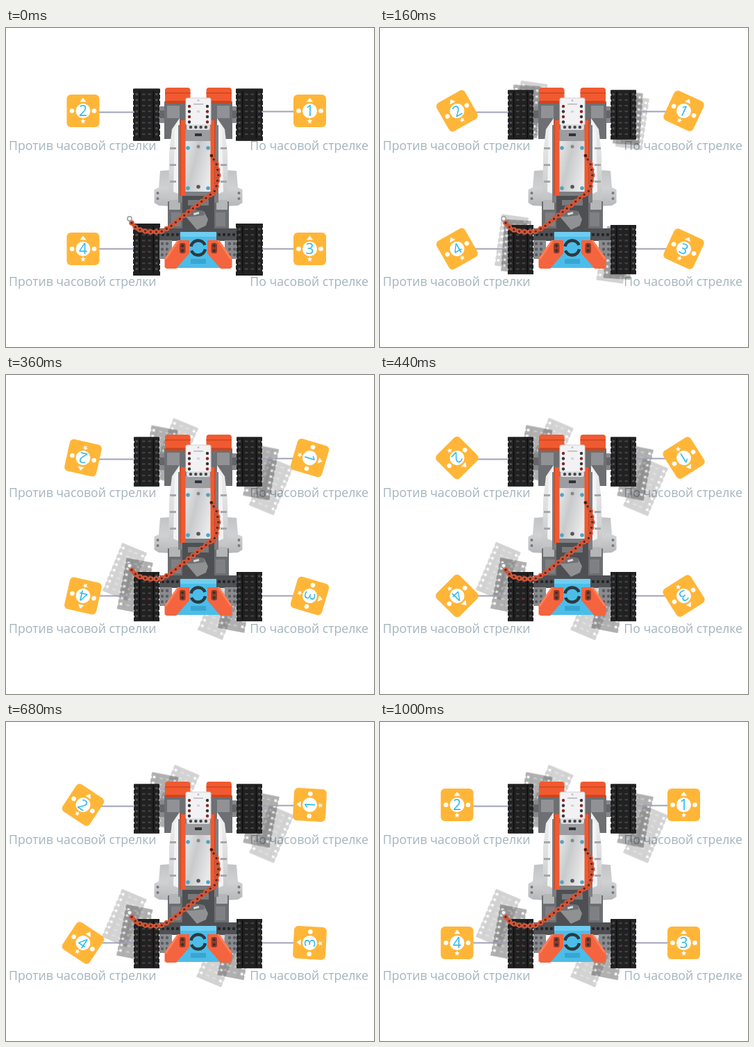
Recreate the animation shown at these times as an HTML page. Size 530 px wide and 460 px high, loop 1040 ms.

```html
<!DOCTYPE html>
<html lang="ru">
<head>
<meta charset="utf-8">
<style>
  html, body { margin: 0; width: 100%; height: 100%; overflow: hidden; background: #fff; }
  svg { display: block; width: 530px; height: 460px; }
  text { font-family: "Open Sans", "Noto Sans", sans-serif; }
</style>
</head>
<body>
<svg id="stage" viewBox="0 0 530 460"></svg>
<script>
const LOOP = 1040, STEP = 40;
const PIVOT = [277, 222];
const WHEELS = [[202.5, 125], [350.5, 125], [202.5, 319.5], [350.5, 319.5]];
const BADGES = [
  { n: 1, x: 437.5, y: 119.5, dir: 1 },
  { n: 2, x: 111, y: 119.5, dir: -1 },
  { n: 3, x: 437.5, y: 318.5, dir: 1 },
  { n: 4, x: 111, y: 318.5, dir: -1 },
];
const GHOSTS = [
  { angle: 23, opacity: 0.2 },
  { angle: 11, opacity: 0.36 },
];

const attrs = o => Object.entries(o).map(([k, v]) => `${k}="${v}"`).join(' ');
const rect = (x, y, width, height, fill, more = {}) =>
  `<rect ${attrs({ x, y, width, height, fill, ...more })}/>`;
const dot = (cx, cy, r, fill, more = {}) => `<circle ${attrs({ cx, cy, r, fill, ...more })}/>`;
const poly = (points, fill, more = {}) => `<polygon ${attrs({ points, fill, ...more })}/>`;
const range = n => [...Array(n).keys()];
const mirrored = s => s + `<g transform="matrix(-1 0 0 1 554 0)">${s}</g>`;

function gradient(id, direction, ...colors) {
  const stops = colors.map((c, i) =>
    `<stop offset="${i / (colors.length - 1)}" stop-color="${c}"/>`).join('');
  return `<linearGradient id="${id}" ${attrs(direction)}>${stops}</linearGradient>`;
}

function wheel(gap, bar) {
  const rows = range(8).map(i => {
    const y = -31 + i * 8.2;
    return rect(-16, y, 3.4, 3.2, gap) + rect(12.6, y, 3.4, 3.2, gap) +
      rect(-6.5, y + 0.5, 4.5, 2.2, bar) + rect(2, y + 0.5, 4.5, 2.2, bar);
  }).join('');
  const teeth = range(9).map(i => rect(-18.5, -35.5 + i * 8.2, 37, 5.6, '#212122')).join('');
  return rect(-17.5, -35.5, 35, 71, '#212122', { rx: 1 }) + teeth + rows +
    rect(-10.5, -34, 1.2, 68, '#0b0b0b') + rect(9.3, -34, 1.2, 68, '#0b0b0b');
}

function badge({ n, x, y }) {
  const star = range(10).map(i => {
    const a = i * Math.PI / 5, r = i % 2 ? 1.7 : 4;
    return `${(r * Math.sin(a)).toFixed(2)},${(15 - r * Math.cos(a)).toFixed(2)}`;
  }).join(' ');
  return `<g transform="translate(${x} ${y})"><g class="badge">` +
    rect(-23.5, -23.5, 47, 47, '#ffb638', { rx: 6 }) +
    dot(0, 0, 10.5, '#fff') + poly('-4.5,-13 4.5,-13 0,-19', '#fff') +
    dot(-16, 0, 3.3, '#fff') + dot(16, 0, 3.3, '#fff') + poly(star, '#fff') +
    `<text y="7.5" font-size="21" fill="#2bb8ee" text-anchor="middle">${n}</text></g></g>`;
}

function label(text, x, y, anchor) {
  return `<text x="${x}" y="${y}" font-size="17.7" fill="#a3b4bd" text-anchor="${anchor}">${text}</text>`;
}

function chassis() {
  const half =
    rect(220, 113, 20, 24, '#85878a') + rect(221, 119, 18, 11, '#636568') +
    rect(228, 106, 50, 54, '#6d6f72') + rect(232, 112, 18, 18, '#909295') +
    poly('236,205 222,206 220,230 213.5,233 213.5,252 220,256 238,257', 'url(#wing)') +
    dot(218.5, 238, 2, '#77797c') + dot(218.5, 246, 2, '#77797c') +
    poly('239,146 250,130 252,262 234,262 235,180', 'url(#side)') +
    poly('243,146 250,134 250,240 241,236', '#f4f4f5') +
    range(3).map(i => rect(236, 172 + i * 24, 9, 3, '#a5a7aa')).join('') +
    rect(233, 250, 44, 42, '#6c6e71') + rect(235, 248, 16, 14, '#b4b6b8') +
    rect(238, 266, 14, 20, '#7e8083') +
    rect(229, 86, 36.5, 23, '#f15a30', { rx: 4 }) + rect(229, 93, 36.5, 1.5, '#cf4620') +
    rect(229, 105, 36.5, 4, '#cc4520', { rx: 2 });
  const core =
    rect(248, 140, 58, 112, '#7d7f82') + rect(254, 242, 46, 50, '#4d4f52') +
    rect(262, 248, 30, 8, '#77797c') +
    rect(258, 146, 38, 90, 'url(#plate)') +
    rect(258, 146, 38, 17, '#9b9da0') + rect(272, 152, 10, 4, '#303236') +
    dot(277, 171, 2.5, '#85888c') + dot(277, 229, 2.8, '#54575b') +
    [173, 231].map(y => dot(262, y, 2.8, '#4aa5c8') + dot(291, y, 2.8, '#4aa5c8')).join('') +
    rect(250.5, 133, 8, 109, '#ee5a32') + rect(294.5, 133, 7, 109, '#ee5a32') +
    rect(250.5, 133, 1.5, 109, '#cc4822') + rect(300, 133, 1.5, 109, '#cc4822');
  const controller =
    rect(259, 101, 36, 39, '#f2f2f4', { rx: 2, stroke: '#cfd0d3' }) +
    rect(260, 139, 34, 8, '#dcdddf', { rx: 3 }) +
    range(4).map(i => dot(264, 113 + i * 7.5, 2.2, i % 2 ? '#343436' : '#8b2522') +
      dot(290, 113 + i * 7.5, 2.2, i % 2 ? '#8b2522' : '#343436') +
      dot(266 + i * 7.3, 143, 2.2, '#45474a')).join('') +
    rect(270, 109, 14, 1.5, '#b4b6b9') + dot(277, 104.5, 1.3, '#b4b6b9') +
    rect(275, 119, 4, 3, '#d2d3d6');
  return mirrored(half) + core + controller;
}

function front() {
  const half =
    rect(221, 289, 56, 18, '#4e5053') + rect(221, 306, 18, 27, '#8a8c8f') +
    range(4).map(i => dot(226 + i * 7, 298, 2.2, '#252629')).join('') +
    range(3).map(i => dot(225, 311 + i * 8, 2.2, '#5b5d60') + dot(232, 311 + i * 8, 2.2, '#5b5d60')).join('');
  const foot =
    poly('228.5,345 228.5,332 247,306 264,306 264,325 245,347 231,347', '#f4643f') +
    poly('228.5,332 247,306 250,306 231,334', '#ff8058') +
    rect(250, 310, 8.5, 15, '#933b27', { rx: 3 }) +
    dot(254.2, 314, 2, '#303236') + dot(254.2, 321, 2, '#303236');
  const servo =
    rect(251, 294, 52, 46, '#4cbde9') + rect(251, 294, 52, 7, '#6fcdf1') +
    rect(240, 333, 74, 13, '#4cbde9') + rect(266, 333, 22, 7, '#38a5d2') +
    '<path d="M266.5 315A10.5 10.5 0 0 1 286.5 313M287 319A10.5 10.5 0 0 1 267 321" fill="none" stroke="#2d3940" stroke-width="4.5"/>';
  return mirrored(half) + servo + mirrored(foot) +
    poly('259,272 266,262 285,264 291,276 288,285 275,291', '#8f9193') +
    poly('259,272 266,262 285,264 286,270 268,272', '#6e7073') +
    rect(270, 266, 8, 3, '#d9dadc', { transform: 'rotate(-14 274 267)' });
}

function chain() {
  const d = 'M181 281L189 290L204 294H223L236 287L302 234L306 211L303 196L296 184';
  const line = more =>
    `<path ${attrs({ d, fill: 'none', 'stroke-linecap': 'round', 'stroke-linejoin': 'round', ...more })}/>`;
  const beads = { 'stroke-dasharray': '0 8' };
  return line({ stroke: '#c04a30', 'stroke-width': 5 }) +
    line({ stroke: '#d9583a', 'stroke-width': 7.6, ...beads }) +
    line({ stroke: '#5e2a20', 'stroke-width': 3.6, ...beads }) +
    dot(178, 275, 3.2, '#f4f4f5', { stroke: '#9a9c9f', 'stroke-width': 1.4 }) +
    dot(296, 184, 2, '#301915');
}

function link(x1, x2, y) {
  return `<path d="M${x1} ${y}H${x2}" stroke="#a0a2b8" stroke-width="1.8"/>`;
}

const place = (id, [x, y], more = '') => `<use href="#${id}" transform="translate(${x} ${y})${more}"/>`;
const down = { x1: 0, y1: 0, x2: 0, y2: 1 }, across = { x1: 0, y1: 0, x2: 1, y2: 0.6 };

document.getElementById('stage').innerHTML =
  `<defs><g id="wheel">${wheel('#4c4d4f', '#434345')}</g><g id="trace">${wheel('#fff', '#666')}</g>` +
  gradient('plate', across, '#f0f0f1', '#c9cacc', '#e9e9ea') +
  gradient('side', down, '#f0f0f1', '#dcddde', '#bcbdc0') +
  gradient('wing', down, '#c2c3c5', '#d0d1d3', '#b6b7ba') + '</defs>' +
  [176, 372].map(y => label('Против часовой стрелки', 4, y, 'start') +
    label('По часовой стрелке', 522, y, 'end')).join('') +
  GHOSTS.map(() => `<g class="ghost">${WHEELS.map(w => place('trace', w, ' scale(1.05)')).join('')}</g>`).join('') +
  link(132, 186, 121.5) + link(368, 416, 120.5) + link(132, 186, 318.5) + link(368, 416, 318.5) +
  chassis() + front() + WHEELS.map(w => place('wheel', w)).join('') +
  dot(205, 322, 1.2, '#7c1f1f') + dot(348, 322, 1.2, '#7c1f1f') +
  chain() + BADGES.map(badge).join('');

const ghostNodes = document.querySelectorAll('.ghost');
const badgeNodes = document.querySelectorAll('.badge');
const clamp = v => Math.min(1, Math.max(0, v));
const smooth = v => { const s = clamp(v); return s * s * (3 - 2 * s); };

// Cubic timing curve with flat ends; x1 and x2 are its horizontal handles.
function bezierEase(t, x1, x2) {
  let lo = 0, hi = 1;
  for (let i = 0; i < 24; i++) {
    const s = (lo + hi) / 2, r = 1 - s;
    if (3 * x1 * s * r * r + 3 * x2 * s * s * r + s * s * s < t) lo = s; else hi = s;
  }
  return smooth(lo);
}

function draw(ms) {
  const t = Math.floor((ms % LOOP) / STEP) * STEP / 1000;
  const clockwise = smooth(t);
  const counter = bezierEase(t, 0.365, 0.305);
  badgeNodes.forEach((node, i) => {
    const turn = BADGES[i].dir > 0 ? clockwise : -counter;
    node.setAttribute('transform', `rotate(${360 * turn})`);
  });
  const spread = smooth(t / 0.4), fade = clamp(t / 0.12);
  ghostNodes.forEach((node, i) => {
    const { angle, opacity } = GHOSTS[i];
    node.setAttribute('transform', `rotate(${angle * spread} ${PIVOT})`);
    node.setAttribute('opacity', 1 + (opacity - 1) * fade);
  });
}

const start = performance.now();
function tick() {
  draw(performance.now() - start);
  requestAnimationFrame(tick);
}
tick();
</script>
</body>
</html>
```
